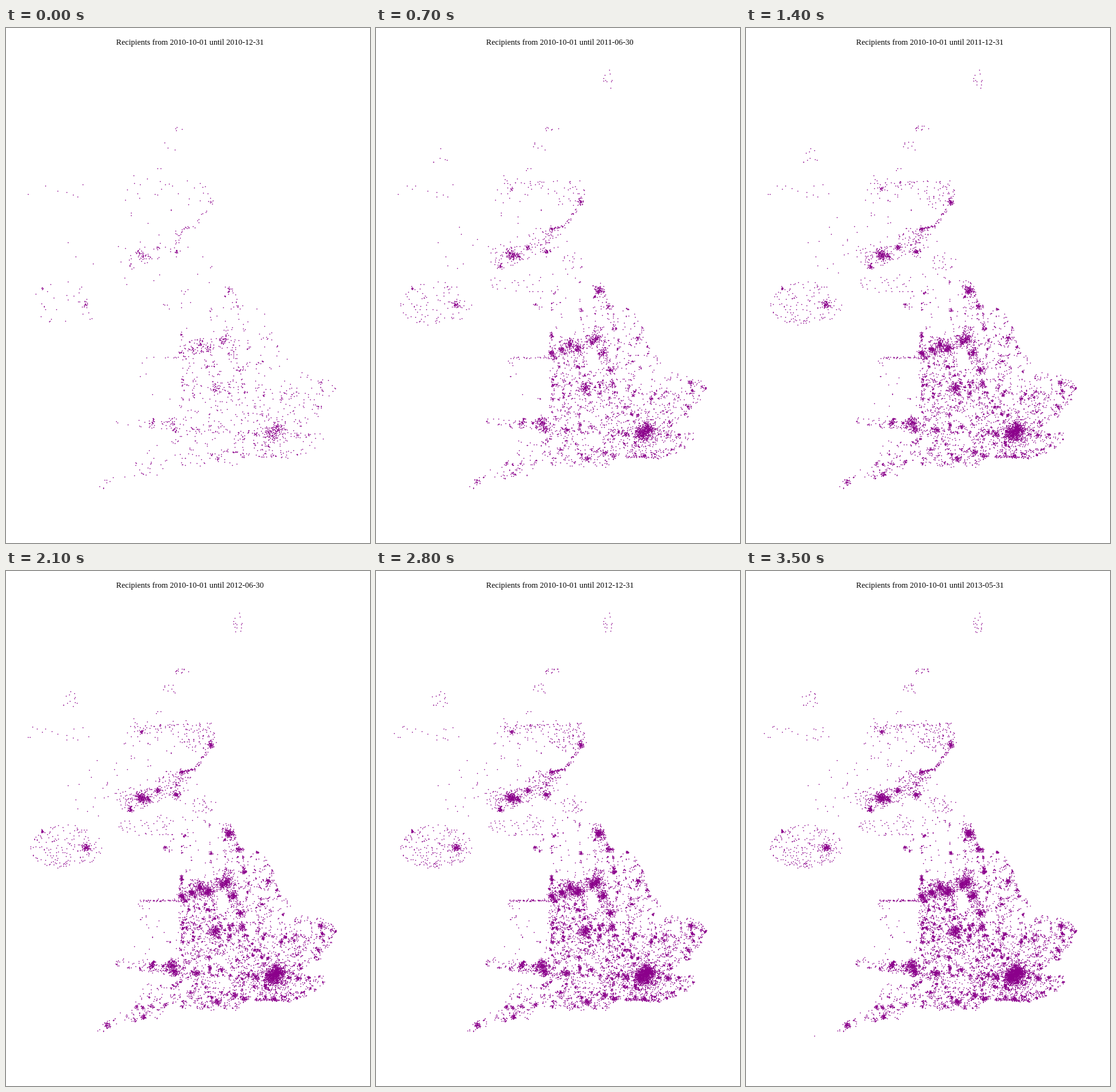
Write a matplotlib script that moves like this. It is 565 px wide and 800 px high and loops after 4200 ms.

```python
import numpy as np
import matplotlib.pyplot as plt
from matplotlib.animation import FuncAnimation
from matplotlib.path import Path

W, H, DPI = 565, 800, 100
PURPLE = "#8b008b"
ENDS = ["2010-12-31", "2011-06-30", "2011-12-31",
        "2012-06-30", "2012-12-31", "2013-05-31"]
SHARE = [0.115, 0.37, 0.57, 0.74, 0.89, 1]  # part visible at each step
rng = np.random.default_rng(12)

# Coast of the southern mainland
COAST = [(322, 354), (348, 388), (363, 429), (397, 437), (416, 464), (423, 495),
         (443, 519), (430, 533), (434, 547), (450, 535), (488, 534), (514, 554),
         (505, 580), (486, 604), (446, 624), (498, 629), (497, 643), (467, 660),
         (439, 670), (372, 667), (362, 682), (301, 683), (253, 676), (240, 698),
         (186, 701), (163, 719), (136, 713), (205, 664), (211, 641), (250, 641),
         (293, 615), (262, 631), (163, 612), (220, 562), (190, 509), (264, 509),
         (272, 462), (242, 430)]

# Towns: x, y, spread
NORTH = [(346, 407, 5.6), (362, 432, 3), (246, 429, 2), (276, 411, 1.5),
         (342, 482, 6), (335, 487, 4), (352, 504, 4.6), (369, 467, 2.2),
         (406, 481, 2.8), (420, 495, 1.8), (313, 498, 6), (301, 491, 5),
         (273, 505, 4.4), (288, 499, 4.4), (272, 477, 2.2)]
MIDDLE = [(324, 559, 5.8), (347, 567, 2.4), (313, 526, 2.8), (363, 531, 4),
          (367, 551, 3), (397, 517, 2), (427, 576, 2.2), (489, 551, 3),
          (511, 560, 2.2), (484, 588, 2.4), (386, 588, 2.2), (315, 600, 2.4)]
SOUTH = [(420, 624, 9.5), (421, 623, 5), (412, 630, 9), (458, 619, 2.6),
         (376, 627, 2.8), (388, 631, 3.6), (334, 619, 2.2), (453, 632, 3),
         (416, 664, 3), (369, 664, 3.2), (354, 659, 3.2), (327, 669, 3.2),
         (295, 625, 3.5), (261, 622, 3.4), (258, 613, 5.2), (226, 613, 3.2),
         (247, 674, 2.2), (214, 692, 2.7), (157, 705, 2.8)]
FAR = [(210, 352, 5.8), (220, 354, 3), (264, 347, 3.4), (235, 341, 2.6),
       (272, 312, 2.2), (317, 270, 2.9), (210, 249, 2), (193, 369, 3),
       (124, 430, 3.8), (56, 404, 1.7)]

# Loose areas: centre, half width, half height, dots
AREAS = [(92, 428, 57, 34, 230), (298, 259, 29, 21, 95),
         (236, 395, 68, 17, 65), (300, 362, 22, 15, 28), (262, 322, 26, 14, 70)]
# Thin areas: the same, then the step at which they begin
ISLES = [(359, 80, 9, 18, 18, 1), (271, 155, 15, 5, 15, 0), (256, 183, 13, 8, 13, 0),
         (97, 199, 15, 13, 17, 1), (90, 251, 65, 14, 22, 0), (225, 260, 45, 45, 62, 0),
         (145, 335, 50, 55, 34, 0), (106, 722, 0, 0, 1, 4)]


def towns(*groups):
    out = []
    for x, y, r in np.vstack(groups):
        n = int(8 * r * r)
        reach = r * rng.uniform(0.3, 1.3, (n, 1))
        out.append((x, y) + rng.normal(size=(n, 2)) * reach)
    return np.vstack(out)


def oval(x, y, rx, ry, n):
    a = rng.uniform(0, 2 * np.pi, n)
    r = np.sqrt(rng.random(n))
    return np.column_stack([x + rx * r * np.cos(a), y + ry * r * np.sin(a)])


def strand(a, b, n, jitter=1.0):
    t = rng.random((n, 1))
    return np.array(a) * (1 - t) + np.array(b) * t + rng.normal(0, jitter, (n, 2))


def on_land(pts):
    return pts[Path(COAST).contains_points(pts)]


def density(x, y):
    hole = np.hypot(x - 335, (y - 510) * 0.8) < 11
    return np.select(
        [hole, (x < 266) & (y > 480) & (y < 604), (x < 290) & (y > 635),
         (y < 478) & (x < 338), y < 478, (x > 372) & (y < 562)],
        [0.04, 0.1, 0.45, 0.12, 0.4, 0.55], 0.95)


def villages():
    spots = on_land(rng.uniform((134, 352), (516, 720), (7600, 2)))
    spots = spots[rng.random(len(spots)) < density(*spots.T)]
    sizes = np.minimum(1 + rng.pareto(1.3, len(spots)), 28).astype(int)
    pts = np.repeat(spots, sizes, axis=0)
    return pts + rng.normal(0, 1.25, pts.shape)


def build():
    mainland = np.vstack([
        towns(NORTH, MIDDLE, SOUTH), villages(),
        strand((385, 665), (440, 666), 100, 0.9),
        strand((205, 512), (265, 511), 60),
        strand((272, 472), (273, 488), 40)])
    pts = np.vstack([
        on_land(mainland), towns(FAR), *(oval(*a) for a in AREAS),
        strand((184, 360), (275, 330), 200, 8),
        strand((198, 244), (280, 238), 50, 2),
        strand((280, 238), (325, 237), 14),
        strand((268, 313), (293, 307), 50),
        strand((293, 307), (318, 272), 45, 1.3)])
    births = np.searchsorted(SHARE, rng.random(len(pts)))
    for *area, since in ISLES:
        new = oval(*area)
        step = np.searchsorted(SHARE, rng.random(len(new)) ** 1.5)
        pts = np.vstack([pts, new])
        births = np.append(births, np.maximum(step, since))
    return pts, births


points, births = build()

fig = plt.figure(figsize=(W / DPI, H / DPI), dpi=DPI, facecolor="white")
ax = fig.add_axes([0, 0, 1, 1])
ax.set_xlim(0, W)
ax.set_ylim(H, 0)
ax.axis("off")
dots, = ax.plot([], [], "o", color=PURPLE, ms=1.5 * 72 / DPI, mew=0)
title = ax.text(285.5, 26, "", ha="center", va="baseline", color="black",
                family="Liberation Serif", size=12.5 * 72 / DPI)


def draw(i):
    dots.set_data(*points[births <= i].T)
    title.set_text(f"Recipients from 2010-10-01 until {ENDS[i]}")
    return dots, title


anim = FuncAnimation(fig, draw, frames=len(ENDS), interval=700, repeat=True)
plt.show()
```
